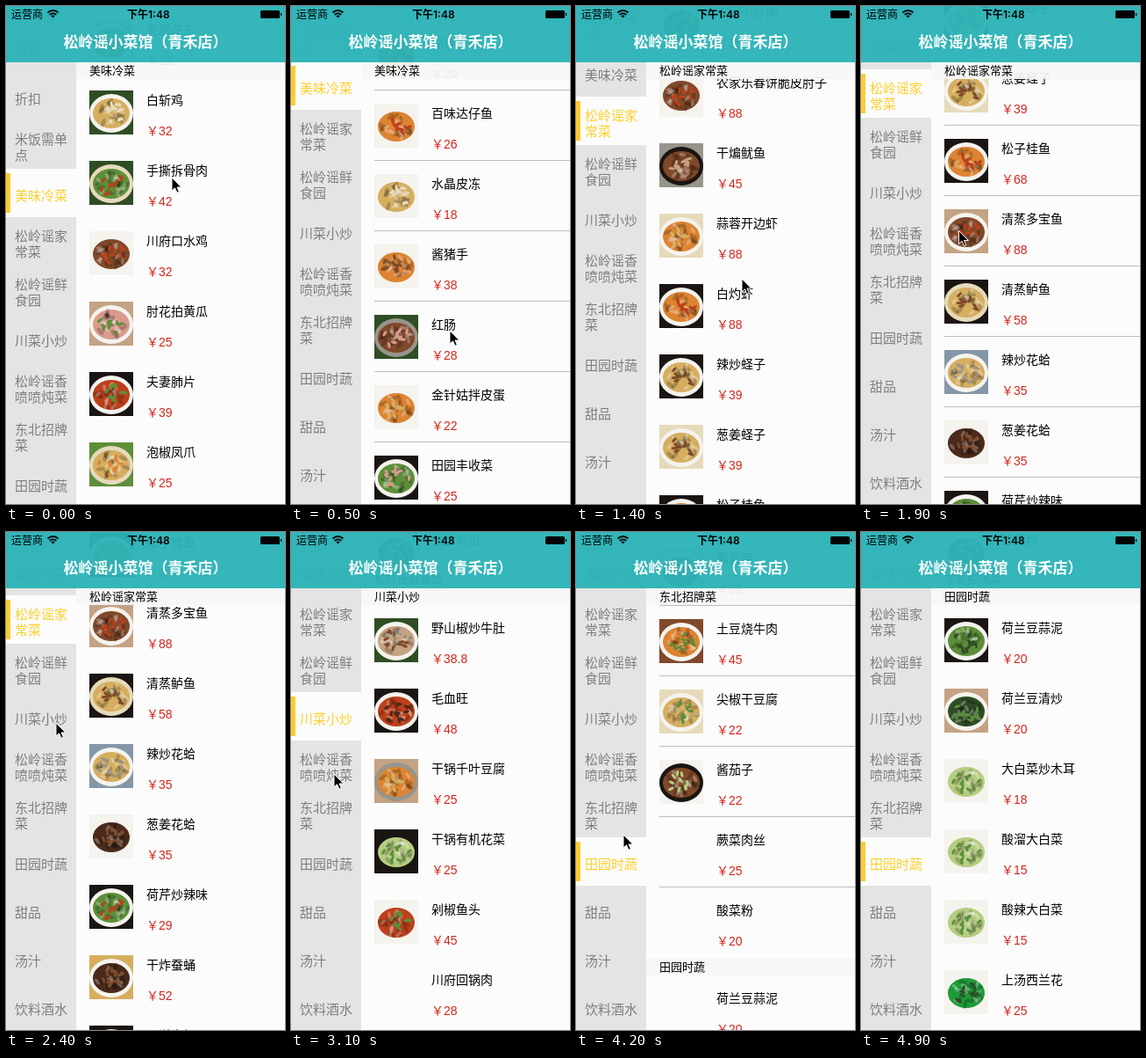
Write an HTML page with a canvas that moves like this. It is 318 px wide and 566 px high and loops after 5000 ms.

```html
<!DOCTYPE html>
<html lang="zh-CN">
<head>
<meta charset="utf-8">
<title>点餐</title>
<style>
* { box-sizing: border-box; }
html, body { margin: 0; width: 100%; height: 100%; overflow: hidden; background: #fcfcfc; }
body { position: relative; font: 14px/18px "Noto Sans CJK SC", "Noto Sans CJK", sans-serif; color: #000; }
#menu, #list { position: absolute; top: 0; height: 566px; padding-top: 63px; overflow: hidden; }
#menu { left: 0; width: 80px; background: #e4e4e4; }
#menu div { position: relative; height: 55px; padding: 5px 9px 0 10px; display: flex; align-items: center;
  font-size: 15px; color: #7e7e7e; word-break: break-all; }
#menu .on { background: #fcfcfc; color: #fdd02f; }
#menu .on::before { content: ""; position: absolute; left: 0; top: 5px; width: 5px; height: 45px; background: #fecb2f; }
#list { left: 80px; width: 238px; }
h2 { position: sticky; top: 0; z-index: 1; height: 20px; margin: 0; padding-left: 15px;
  font-size: 13px; line-height: 20px; font-weight: 400; background: rgba(247,247,247,.93); }
.row { position: relative; height: 80px; }
.row > * { position: absolute; left: 80px; white-space: nowrap; }
.row canvas { left: 15px; top: 15px; }
.row b { top: 16px; font-weight: 400; }
.row i { top: 52px; font-style: normal; color: #d3261d;
  font-family: "Liberation Sans", "Noto Sans CJK SC", "Noto Sans CJK", sans-serif; }
.lines .row:not(:last-child)::after { content: ""; position: absolute; left: 15px; right: 0; bottom: 0; height: 1px; background: #bdbdbd; }
#nav { position: absolute; z-index: 2; left: 0; top: 0; width: 318px; height: 64px; background: rgba(44,180,184,.96); }
#nav span { position: absolute; top: 0; font-size: 12px; white-space: nowrap; }
#nav .clock { left: 138px; top: 1px; font-family: Inter, "Noto Sans CJK SC", "Noto Sans CJK", sans-serif; font-weight: 600; }
#nav h1 { position: absolute; left: 0; top: 28px; width: 100%; margin: 0; text-align: center; color: #fff;
  font-size: 17px; line-height: 24px; font-weight: 600; white-space: nowrap; }
svg { position: absolute; left: 0; top: 0; overflow: visible; }
#mouse { z-index: 3; }
</style>
</head>
<body>
<div id="menu"></div>
<div id="list"></div>
<div id="nav">
  <span style="left:6px">运营商</span>
  <span class="clock">下午1:48</span>
  <svg width="318" height="20">
    <path d="M47.5 7.5Q53.5 2.5 59.5 7.5M49.7 10Q53.5 6.8 57.3 10" fill="none" stroke="#000" stroke-width="1.8"/>
    <path d="M51.3 11.3Q53.5 9.6 55.7 11.3L53.5 13.6Z"/>
    <rect x="290" y="5" width="22" height="9" rx="1.5"/>
    <path d="M313 8h1.2v3H313z"/>
  </svg>
  <h1>松岭谣小菜馆（青禾店）</h1>
</div>
<svg id="mouse" width="12" height="18">
  <path d="M0 0V15L3.5 11.8L6 17.3L8.4 16.2L6 11H10.8Z" stroke="#fff"/>
</svg>
<script>
const LOOP = 5000, STEP = 100;
const $ = id => document.getElementById(id);
const menu = $('menu'), list = $('list'), mouse = $('mouse');

const COLORS = {
  w: '#f5f3ee', k: '#1a1512', r: '#bd401c', o: '#dc8432', b: '#80492a', y: '#d5ae60',
  g: '#5d8f3a', n: '#2f4d25', t: '#c3a383', s: '#98948c', p: '#d89a8c', l: '#b5cd80',
  d: '#4a2a1a', c: '#e6dabb', v: '#1f9a3a', u: '#8596a8'
};

// category, time its photos start to load, dishes: name, price, colours of table, plate, food, garnish
const CATS = [
  ['热销'], ['折扣'], ['米饭需单点'],
  ['美味冷菜', -9999, '老醋花生22 白斩鸡32nwyc 手撕拆骨肉42ncgr 川府口水鸡32wwbr 肘花拍黄瓜25twpg 夫妻肺片39kwrg ' +
    '泡椒凤爪25gcyo 凉拌木耳20 百味达仔鱼26wwor 水晶皮冻18wwyc 酱猪手38wwob 红肠28nsbp 金针姑拌皮蛋22wwoy ' +
    '田园丰收菜25kwgp 皮蛋豆腐18 糖拌番茄16'],
  ['松岭谣家常菜', -9999, '农家小炒肉38 农家乐春饼脆皮肘子88wwbr 干煸鱿鱼45skbt 蒜蓉开边虾88cwoy 白灼虾88kwor ' +
    '辣炒蛏子39kwyb 葱姜蛏子39cwyb 松子桂鱼68kwor 清蒸多宝鱼88twbr 清蒸鲈鱼58kcyb 辣炒花蛤35uwys ' +
    '葱姜花蛤35wwdb 荷芹炒辣味29kwgr 干炸蚕蛹52ywdb 干迸虫蛹52kwob 木须肉28'],
  ['松岭谣鲜食园', 2500, '地三鲜26 溜肉段38 锅包肉42 拔丝地瓜32'],
  ['川菜小炒', 2650, '野山椒炒牛肚38.8nwtb 毛血旺48kwrd 干锅千叶豆腐25tsoy 干锅有机花菜25kklg 剁椒鱼头45wwrg ' +
    '川府回锅肉28cwbg 鱼香肉丝26 宫保鸡丁28'],
  ['松岭谣香喷喷炖菜', 3250, '小鸡炖蘑菇58 排骨炖豆角48 酸菜炖粉条36 铁锅炖鱼68 牛肉炖柿子46 白菜炖豆腐22 羊肉炖萝卜52'],
  ['东北招牌菜', 3850, '酱骨架52 土豆烧牛肉45bwog 尖椒干豆腐22cwyg 酱茄子22wkbl 蕨菜肉丝25 酸菜粉20'],
  ['田园时蔬', 4250, '荷兰豆蒜泥20kwgn 荷兰豆清炒20twng 大白菜炒木耳18wwlg 酸溜大白菜15wwlg 酸辣大白菜15wwlg ' +
    '上汤西兰花25wwvn 清炒菠菜18'],
  ['甜品'], ['汤汁'], ['饮料酒水']
];

function add(parent, tag, text = '') {
  const el = parent.appendChild(document.createElement(tag));
  el.textContent = text;
  return el;
}

function paintDish(canvas, code) {
  canvas.width = canvas.height = 50;
  const c = canvas.getContext('2d');
  const [table, plate, food, garnish] = [...code].map(k => COLORS[k]);
  let seed = code.charCodeAt(2) * 31 + code.charCodeAt(3);
  const rnd = () => (seed = seed * 16807 % 2147483647) / 2147483647;
  const oval = (x, y, rx, ry, turn, color) => {
    c.fillStyle = color;
    c.beginPath();
    c.ellipse(x, y, rx, ry, turn, 0, 7);
    c.fill();
  };
  const scatter = (n, color, size, spread) => {
    for (let i = 0; i < n; i++) {
      const a = rnd() * 6.28, d = Math.sqrt(rnd()) * spread;
      oval(25 + Math.cos(a) * d, 26 + Math.sin(a) * d * .8, size, size * .45, rnd() * 3, color);
    }
  };
  c.fillStyle = table;
  c.fillRect(0, 0, 50, 50);
  oval(25, 26, 25, 22, 0, plate);
  oval(25, 26, 21, 17, 0, food);
  scatter(12, '#0003', 5, 17);
  scatter(10, '#fff4', 4, 17);
  scatter(10, garnish, 3.5, 15);
}

const tops = [], photos = [];
let height = 0;
const cells = CATS.map(([name, loadAt, dishes], i) => {
  tops[i] = height;
  if (dishes) {
    const section = add(list, 'section');
    add(section, 'h2', name);
    dishes.split(' ').forEach((dish, n) => {
      const [, title, price, code] = dish.match(/^(\D+)([\d.]+)(\w*)$/);
      const row = add(section, 'div');
      row.className = 'row';
      const photo = add(row, 'canvas');
      paintDish(photo, code || 'cwby');
      photos.push([photo, loadAt + n * 100]);
      add(row, 'b', title);
      add(row, 'i', '￥' + price);
      height += 80;
    });
    height += 20;
  }
  return add(menu, 'div', name);
});

const linear = p => p;
const swing = p => (1 - Math.cos(Math.PI * p)) / 2;
const speedUp = p => p * p;
const slowDown = p => p * (2 - p);
const coast = n => p => (1 - Math.exp(-n * p)) / (1 - Math.exp(-n));   // flick decay over n half seconds

// keys: [time, value, easing towards this key]
function track(keys, t) {
  const i = keys.findIndex(k => k[0] > t);
  if (i < 0) return keys[keys.length - 1][1];
  if (!i) return keys[0][1];
  const [t0, a] = keys[i - 1], [t1, b, ease = linear] = keys[i];
  return a + (b - a) * ease((t - t0) / (t1 - t0));
}

const [, , , , HOME, , WOK, STEW, BEST, GREENS] = tops;
const scroll = [
  [0, 82], [500, 627.5, coast(1)], [1400, HOME + 102], [2400, HOME + 657, coast(2)],
  [2500, HOME + 657], [2800, WOK, swing],
  [3200, WOK], [3500, STEW, swing],
  [3700, STEW], [4000, BEST, swing],
  [4120, BEST], [4200, BEST + 79.5, speedUp], [4420, GREENS, slowDown]
];
const menuScroll = [[-102, 0], [198, 165, swing], [1284, 165], [1584, 211, swing]];
const picks = [[0, 3], [1284, 4], [2500, 6], [3200, 7], [3700, 8], [4120, 9]];
const mouseX = [[0, 189], [500, 181], [1400, 189], [2300, 57, swing], [2600, 57], [3100, 49], [3700, 50], [4100, 54]];
const mouseY = [[0, 195], [500, 369, swing], [800, 220, swing], [1100, 350, swing], [1400, 310, swing],
  [2300, 217, swing], [2600, 217], [3100, 275], [3250, 275], [3650, 318], [3750, 318], [4100, 344]];

function draw(t) {
  const y = Math.round(track(scroll, t) * 2) / 2;
  list.scrollTop = Math.floor(y);
  list.classList.toggle('lines', y % 1 > 0);   // hairlines only show on half pixels
  menu.scrollTop = Math.round(track(menuScroll, t));
  const picked = picks.filter(p => p[0] <= t).pop()[1];
  cells.forEach((cell, i) => cell.classList.toggle('on', i === picked));
  photos.forEach(([photo, at]) => photo.style.visibility = t >= at ? 'visible' : 'hidden');
  mouse.style.transform = `translate(${track(mouseX, t)}px, ${track(mouseY, t)}px)`;
  mouse.style.visibility = t < 4700 ? 'visible' : 'hidden';
}

const start = performance.now();
function tick() {
  const t = (performance.now() - start) % LOOP;
  draw(Math.floor(t / STEP) * STEP);
  requestAnimationFrame(tick);
}
tick();
</script>
</body>
</html>
```
